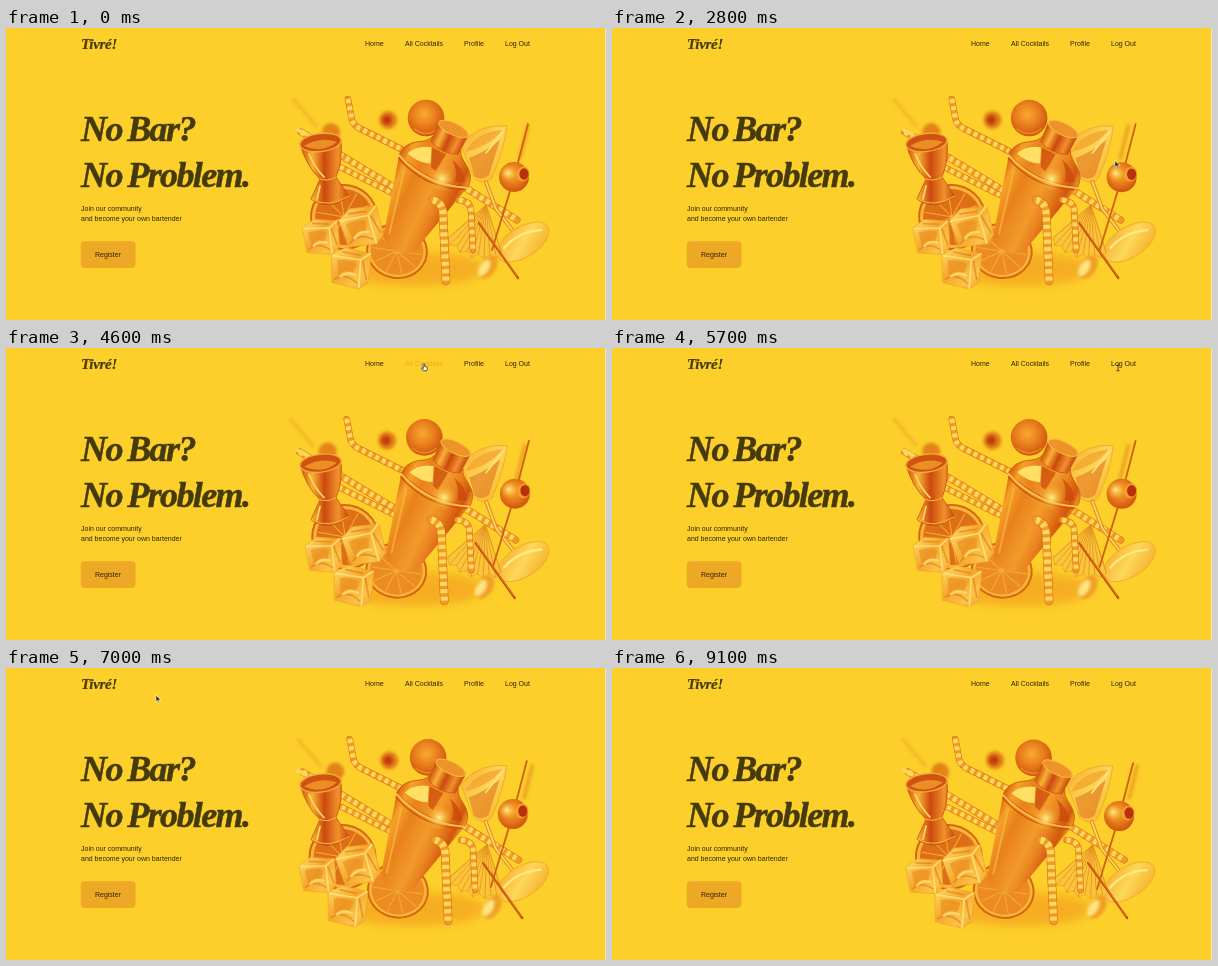
An HTML page that plays this animation: 600x292 px, repeating every 9200 ms.

```html
<!DOCTYPE html>
<html lang="en">
<head>
<meta charset="utf-8">
<title>Cocktails</title>
<style>
  html, body { margin: 0; width: 100%; height: 100%; overflow: hidden; background: #fccf2b; }
  svg { display: block; width: 600px; height: 292px; }
  text { font: 7px "Liberation Sans", Arial, sans-serif; fill: #2e2408; }
  .script { font: italic bold 36px "Liberation Serif", "Noto Serif", serif; letter-spacing: -1.6px; word-spacing: -2px;
    fill: #453a0b; stroke: #453a0b; stroke-width: .5; }
  .logo { font-size: 15px; letter-spacing: -.3px; stroke-width: .2; }
  path { stroke-linecap: round; stroke-linejoin: round; }
</style>
</head>
<body>
<svg viewBox="0 0 600 292">
  <defs>
    <linearGradient id="metal">
      <stop offset="0" stop-color="#d8600d"/><stop offset=".12" stop-color="#f5a128"/>
      <stop offset=".3" stop-color="#e9811a"/><stop offset=".58" stop-color="#f29a2a"/>
      <stop offset=".72" stop-color="#ea8420"/><stop offset=".9" stop-color="#d2560e"/>
      <stop offset="1" stop-color="#f0a027"/>
    </linearGradient>
    <linearGradient id="cup">
      <stop offset="0" stop-color="#cc4c0d"/><stop offset=".25" stop-color="#f9b034"/>
      <stop offset=".5" stop-color="#cb490e"/><stop offset=".78" stop-color="#f0912a"/>
      <stop offset="1" stop-color="#c8450d"/>
    </linearGradient>
    <linearGradient id="glass" x2="1" y2="1">
      <stop offset="0" stop-color="#f6a928"/><stop offset=".5" stop-color="#fed75a"/>
      <stop offset="1" stop-color="#f4a824"/>
    </linearGradient>
    <linearGradient id="ice" x2="1" y2="1">
      <stop offset="0" stop-color="#ffdf6c"/><stop offset=".45" stop-color="#f5a62c"/>
      <stop offset=".75" stop-color="#fbc447"/><stop offset="1" stop-color="#f2a02a"/>
    </linearGradient>
    <radialGradient id="ball" cx=".45" cy=".4" r=".62">
      <stop offset="0" stop-color="#f9a932"/><stop offset=".5" stop-color="#e97f1c"/>
      <stop offset="1" stop-color="#cf500e"/>
    </radialGradient>
    <radialGradient id="shine">
      <stop offset="0" stop-color="#fff08a"/><stop offset="1" stop-color="#f6a823" stop-opacity="0"/>
    </radialGradient>
    <filter id="soft" x="-1" y="-1" width="3" height="3"><feGaussianBlur stdDeviation="1.6"/></filter>
    <filter id="haze" x="-1" y="-1" width="3" height="3"><feGaussianBlur stdDeviation="5"/></filter>
  </defs>

  <g id="art" fill="none"></g>

  <text class="script logo" x="75" y="21">Tivré!</text>
  <g id="nav">
    <text x="359" y="18">Home</text>
    <text x="399" y="18">All Cocktails</text>
    <text x="458" y="18">Profile</text>
    <text x="499" y="18">Log Out</text>
  </g>
  <text class="script" x="75" y="113">No Bar?</text>
  <text class="script" x="75" y="159">No Problem.</text>
  <text x="75" y="182.5">Join our community</text>
  <text x="75" y="192.7">and become your own bartender</text>
  <rect x="74.7" y="213.3" width="54.8" height="26.7" rx="4" fill="#eda826"/>
  <text x="102" y="229" text-anchor="middle">Register</text>
  <rect x="599" width="1" height="292" fill="#fbe7a0"/>

  <g id="cursor">
    <path d="M0 0V7.2L1.8 5.6 3 8.2 4.2 7.6 3 5.2H5.2Z" fill="#222" stroke="#fff" stroke-width=".6"/>
    <path d="M-1 0Q0-1 .8 0V3L3.5 3.6Q4.3 4 4 5.2L3.2 8H-.8L-3 4.8Q-2.5 3.6-1 5Z" fill="#fff" stroke="#222" stroke-width=".9"/>
    <path d="M-1.4-3.5Q0-3.5 0-2.5Q0-3.5 1.4-3.5M0-2.5V2.5M-1.4 3.5Q0 3.5 0 2.5Q0 3.5 1.4 3.5" fill="none" stroke="#222" stroke-width=".9"/>
  </g>
</svg>
<script>
const LOOP = 9200;
const art = document.getElementById('art');
const links = [...document.querySelectorAll('#nav text')];
const cursor = document.getElementById('cursor');

// a layer shifts by (kx, ky) for each pixel the pointer is off centre
const layer = (kx, ky, body) => `<g data-k="${kx} ${ky}">${body}</g>`;
const stroke = (d, color, w, extra = '') =>
  `<path d="${d}" stroke="${color}" stroke-width="${w}" ${extra}/>`;
const straw = (d, w) =>
  stroke(d, '#dc6f12', w) + stroke(d, '#f19a2a', w - 1.2) +
  stroke(d, '#ffd95c', w - 1.4, 'stroke-dasharray="4 3.4" style="stroke-linecap:butt"');

const slice = (x, y, rx, ry, turn, pulp) => {
  let spokes = '';
  for (let i = 0; i < 10; i++) {
    const a = i * Math.PI / 5;
    spokes += `M0 0L${rx * .8 * Math.cos(a)} ${ry * .8 * Math.sin(a)}`;
  }
  return `<g transform="translate(${x} ${y}) rotate(${turn})">
    <ellipse rx="${rx}" ry="${ry}" fill="#d8650f"/>
    <ellipse rx="${rx - 2}" ry="${ry - 2}" fill="#f8b53c"/>
    <ellipse rx="${rx * .85}" ry="${ry * .85}" fill="${pulp}"/>${stroke(spokes, '#f5ab36', 1)}</g>`;
};

const cube = (x, y, s, turn) => `<g transform="translate(${x} ${y}) rotate(${turn}) scale(${s})">
  <path d="M-17-11L-5-18 18-14 17 12 9 18-15 14Z" fill="url(#ice)" stroke="#f0a128" stroke-width=".6"/>
  <path d="M-16-10L9-8 17-14M9-8L9 17" stroke="#ffe680" stroke-width="1.6" opacity=".8"/>
  <path d="M-12-6Q-2-8 6-4L3 5Q-6 0-10 9Z" fill="#e98a1e" opacity=".6"/>
  <path d="M-13 11Q-4 4 7 13M11-7L15 9M-7-14L8-12" stroke="#da6f14" stroke-width="1.4" opacity=".55"/>
  <path d="M-8 8Q-2 3 5 6" stroke="#ffe680" stroke-width="2.4" opacity=".7"/></g>`;

const umbrella = () => {
  let ribs = '', edge = 'M480 177';
  for (let i = 0; i <= 10; i++) {
    const a = 2.42 - i * .116, r = 50 + 4 * (i % 2);
    const p = `${480 + r * Math.cos(a)} ${177 + r * Math.sin(a)}`;
    edge += 'L' + p;
    ribs += 'M480 177L' + p;
  }
  return `<path d="${edge}Z" fill="#fbc53a" stroke="#eca624" stroke-width=".8"/>` + stroke(ribs, '#e39020', .8);
};

art.innerHTML =
  `<ellipse cx="408" cy="241" rx="72" ry="17" fill="#f2991a" opacity=".6" filter="url(#haze)"/>` +
  layer(-.028, .005, `<g filter="url(#soft)">
    ${stroke('M288 72L310 98', '#f5b726', 3.5)}
    <circle cx="325" cy="104" r="9" fill="#e48414"/></g>`) +
  layer(-.008, -.005, `<g filter="url(#soft)"><circle cx="382" cy="92" r="9" fill="#e27f18"/>
    <circle cx="381" cy="92" r="5" fill="#c23a0d"/></g>`) +
  layer(.01, 0, slice(338, 189, 34, 33, 10, '#df6f17')) +
  layer(-.011, 0,
    straw('M342 71L346 92Q348 98 355 101L399 123', 6.5) +
    straw('M295 104L338 129 396 164', 7) +
    straw('M334 139L390 167', 6) +
    straw('M455 157L511 192', 7)) +
  layer(.002, .004, `
    <path d="M455 116Q474 95 501 98Q498 122 486 150Q480 158 469 151Z" fill="url(#glass)" stroke="#f0a324" stroke-width=".8"/>
    <path d="M459 124Q470 104 496 102Q484 118 459 124" fill="#f2a128" opacity=".7"/>
    <path d="M463 130Q479 124 494 112L483 147Q475 154 468 148Z" fill="#e37c1c" opacity=".65"/>
    ${stroke('M480 125L497 104', '#ffe580', 1.6)}
    ${stroke('M480 154L490 181 511 208', '#e88f1e', 4)}${stroke('M480 154L490 181 511 208', '#ffdd66', 1.6)}
    <ellipse cx="517" cy="214" rx="29" ry="15" transform="rotate(-32 517 214)" fill="url(#glass)" stroke="#f3ad26"/>
    ${stroke('M498 220Q511 204 535 202', '#ffe880', 2.4)}`) +
  layer(-.014, .006, `<circle cx="420" cy="90" r="18.3" fill="url(#ball)"/>
    ${stroke('M408 101Q420 110 432 101', '#f2962a', 1.6, 'opacity=".7"')}`) +
  layer(-.006, .004, umbrella()) +
  layer(-.028, 0, `
    <g filter="url(#soft)">${stroke('M522 98L514 130', '#eda022', 3.5)}
    <ellipse cx="482" cy="239" rx="8" ry="13" transform="rotate(32 482 239)" fill="#f0a022"/>
    <ellipse cx="478" cy="240" rx="4.5" ry="9" transform="rotate(32 478 240)" fill="#ffe580"/></g>
    ${stroke('M473 195L512 250', '#c24a0d', 2.2)}${stroke('M473 194L511 248', '#f3a12a', .6)}`) +
  layer(.008, .03, `${stroke('M522 96L508 150 486 222', '#cf600e', 1.8)}
    <circle cx="508" cy="149" r="15" fill="url(#ball)"/>
    <ellipse cx="517" cy="146" rx="6.4" ry="7.5" transform="rotate(20 517 146)" fill="#f3a02c"/>
    <ellipse cx="518" cy="146" rx="4.6" ry="5.8" fill="#b9300c"/>
    <circle cx="502" cy="145" r="9" fill="url(#shine)"/>`) +
  layer(0, -.006, `
    <path d="M294 116Q300 138 314 151L305 171Q322 184 343 168L330 149Q337 133 335 112Z" fill="url(#cup)" stroke="#c8500d" stroke-width=".8"/>
    <ellipse cx="314.5" cy="114.5" rx="20.7" ry="9" transform="rotate(-7 314.5 114.5)" fill="#cf540f" stroke="#f4a83a" stroke-width="1.4"/>
    <path d="M298 118Q314 108 331 114Q316 126 298 118" fill="#ec8d26"/>
    ${stroke('M314 151Q322 154 330 149M306 171Q322 181 343 168', '#f9b844', 1)}
    ${stroke('M303 126Q309 140 318 149M314 158L311 171', '#ffd75c', 1.8)}
    ${stroke('M292 102L300 106', '#ffd55a', 4)}`) +
  layer(-.006, .004, slice(391, 223, 31, 28, 8, '#ec8c20')) +
  layer(.018, .012, `<g transform="translate(390 222) rotate(25.4)">
    <path d="M-38-88L-17-6Q0 8 17-6L38-88Z" fill="url(#metal)"/>
    <path d="M-27-76L-13-12" stroke="#fbc047" stroke-width="2" opacity=".6"/>
    <path d="M-38-88C-38-108-18-107-16-118H16C18-107 38-108 38-88Q0-73-38-88" fill="url(#metal)" stroke="#cc590f" stroke-width=".8"/>
    <path d="M-31-92Q-26-104-12-108L-6-93Q-17-88-31-92" fill="#ffe064"/>
    <path d="M-11-108L4-108 2-88-4-90Z" fill="#cc4d0e" opacity=".75"/>
    <path d="M12-106Q28-102 33-91L24-87Q22-98 12-106" fill="#c8480d" opacity=".75"/>
    <path d="M-38-87Q0-71 38-87" stroke="#ffc24d" stroke-width="1.8"/>
    <path d="M-37-84Q0-68 36-84" stroke="#c9500c" stroke-width="1.2"/>
    <path d="M-16-134L-15-113Q0-106 15-113L16-134Z" fill="url(#cup)" stroke="#cf600d" stroke-width=".8"/>
    <ellipse cy="-134" rx="16" ry="6" fill="#ee922a" stroke="#f9b944"/>
    <circle cx="11" cy="-84" r="13" fill="url(#shine)"/></g>`) +
  layer(-.014, 0,
    straw('M427 172Q436 174 437 185L440 253', 8.6) +
    straw('M453 172Q464 173 465 182L467 222', 6.5)) +
  layer(.0225, .02, cube(355, 199, 1.14, -16) + cube(315, 209, 1.02, -6) + cube(344, 240, 1.12, 4));

const layers = [...art.querySelectorAll('[data-k]')].map(el => [el, ...el.dataset.k.split(' ').map(Number)]);

// pointer route: time, x, y
const route = [
  [0, 438, 291], [400, 420, 235], [1000, 355, 160], [1700, 324, 123], [2100, 338, 128],
  [2800, 503, 133], [3300, 512, 125], [4100, 420, 40], [4600, 418, 16], [5100, 460, 17],
  [5700, 506, 20], [6100, 480, 30], [7000, 150, 27.5], [7500, 70, 55], [8100, 95, 95],
  [9000, 187, 95], [LOOP, 187, 95]
];
const pointer = t => {
  const i = route.findIndex(k => k[0] > t);
  const [t0, x0, y0] = route[i - 1], [t1, x1, y1] = route[i];
  const u = (t - t0) / (t1 - t0), e = u * u * (3 - 2 * u);
  return [x0 + (x1 - x0) * e, y0 + (y1 - y0) * e];
};

function draw(now) {
  const t = Math.floor(now % LOOP / 100) * 100;
  const [x, y] = pointer(t);
  // the picture starts at rest and follows only once the pointer is over it
  const follow = Math.min(1, t / 1700) ** 4;
  const dx = (x - 300) * follow, dy = (y - 126) * follow;
  for (const [el, kx, ky] of layers) el.setAttribute('transform', `translate(${dx * kx} ${dy * ky})`);

  const inLink = el => {
    const left = +el.getAttribute('x');
    return x >= left && x <= left + el.getComputedTextLength() && y > 10;
  };
  let shape = 0;
  for (const el of links) {
    const over = inLink(el) && y < 19.3;
    el.style.fill = over ? '#edaa25' : '';
    if (over) shape = 1;
    else if (inLink(el) && y < 23) shape = 2;
  }
  [...cursor.children].forEach((p, i) => p.style.display = i === shape ? '' : 'none');
  cursor.setAttribute('transform', `translate(${x} ${y}) scale(.85)`);
  cursor.style.display = t < 9000 ? '' : 'none';
  requestAnimationFrame(draw);
}
requestAnimationFrame(draw);
</script>
</body>
</html>
```
